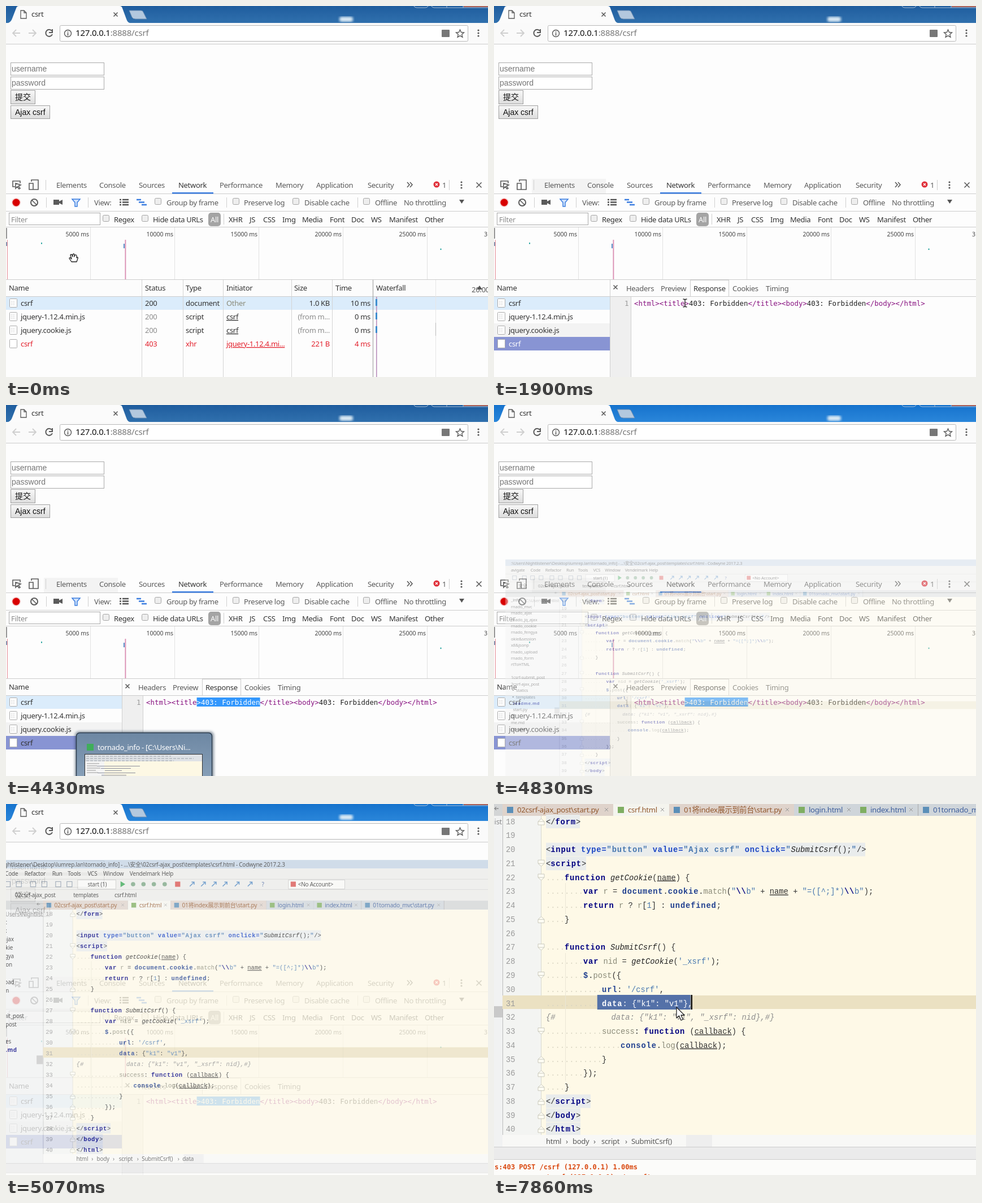
An HTML page for the animation above (8 s loop, 853 px wide and 657 px high).

```html
<!DOCTYPE html>
<html lang="en">
<head>
<meta charset="utf-8">
<title>csrf demo</title>
<style>
html, body { margin: 0; width: 853px; height: 657px; overflow: hidden; background: #fdfdfd }
svg { display: block }
text { font: 13px 'Noto Sans', 'Noto Sans CJK SC', 'Noto Sans CJK', sans-serif; letter-spacing: -.3px; fill: #5a5a5a; white-space: pre }
.dark { fill: #333 } .red, .red tspan { fill: #e3202c } .dim { fill: #8c8c8c } .white { fill: #fff }
.end { text-anchor: end }
.tick { font-size: 10.5px; letter-spacing: 0; fill: #444; text-anchor: end }
.form { font: 14px 'Liberation Sans', 'Noto Sans CJK SC', 'Noto Sans CJK', sans-serif; letter-spacing: 0; fill: #111 }
.hint { fill: #757575 }
.url { font-size: 15px; letter-spacing: -.2px; fill: #777 }
.mono { font: 12.4px 'DejaVu Sans Mono', monospace; letter-spacing: 0; fill: #222 }
.log { font: bold 12px 'DejaVu Sans Mono', monospace; letter-spacing: 0; fill: #d9480f }
.code { font: 13.75px 'Liberation Mono', monospace; letter-spacing: 0; fill: #333 }
.num { fill: #9a9a9a }
.k, .b, .p { font-weight: bold; letter-spacing: .85px }
.k { fill: #000080 } .b { fill: #1c46c4 } .p { fill: #1f3f8f } .s { fill: #4878b0 } .v { fill: #4878b0; font-weight: bold; letter-spacing: .85px }
.i { font-style: italic; fill: #222 } .g { fill: #8a8a78 } .c { font-style: italic; fill: #8c8c8c }
.u { text-decoration: underline; fill: #333 } .d { fill: #d9d5c2 } .t { fill: #881280 } .h { fill: #111 }
.sel text, .sel tspan { fill: #fff }
.tab { fill: #93592f; font-size: 13.2px } .tab2 { fill: #3f5f9c; font-size: 13.2px }
.line { stroke: #ccc; fill: none } .icon { stroke: #5a5a5a; fill: none; stroke-width: 1.6 }
</style>
</head>
<body>
<svg id="stage" width="853" height="657" viewBox="0 0 853 657"></svg>
<script>
const esc = s => s.replace(/&/g, '&amp;').replace(/</g, '&lt;');
const rich = s => esc(s).replace(/«(\w)(.*?)»/g, '<tspan class="$1">$2</tspan>');
const text = (x, y, s, cls = '') => `<text x="${x}" y="${y}" class="${cls}">${rich(s)}</text>`;
const rect = (x, y, w, h, fill, more = '') => `<rect x="${x}" y="${y}" width="${w}" height="${h}" fill="${fill}" ${more}/>`;
const path = (d, more = 'class="line"') => `<path d="${d}" ${more}/>`;
const dot = (x, y, r, fill, more = '') => `<circle cx="${x}" cy="${y}" r="${r}" fill="${fill}" ${more}/>`;
const group = (id, inner, more = '') => `<g id="${id}" ${more}>${inner}</g>`;
// "x label|x label" laid on one baseline
const row = (y, list, cls) => list.split('|').map(e => {
  const [, x, s] = e.match(/^(-?\d+) (.*)$/);
  return text(x, y, s, cls);
}).join('');
const vlines = (xs, y1, y2, color = '#d0d0d0') => path(xs.map(x => `M${x}.5 ${y1}V${y2}`).join(''), `stroke="${color}"`);
const hlines = ys => path(ys.map(y => `M0 ${y}.5H853`).join(''));
const box = (x, y) => rect(x + .5, y + .5, 11, 11, '#eee', 'stroke="#a5a5a5" rx="2"');
const dots3 = (x, y) => [-5, 0, 5].map(d => dot(x, y + d, 1.6, '#555')).join('');
const cross = (x, y, r) => path(`M${x - r} ${y - r}l${2 * r} ${2 * r}m0 ${-2 * r}l${-2 * r} ${2 * r}`, 'class="icon"');

function browser() {
  const field = (y, s) => rect(8.5, y + .5, 165, 22, '#fff', 'stroke="#a9a9a9"') + text(10, y + 16, s, 'form hint');
  const button = (y, w, h, s) => rect(8.5, y + .5, w, h, 'url(#btn)', 'stroke="#a0a0a0"') + text(16, y + 17, s, 'form');
  return rect(0, 0, 853, 657, '#fdfdfd') +
    rect(0, 0, 853, 30, 'url(#glass)', 'id="titlebar"') +
    rect(590, 19, 24, 9, '#dcebf5', 'rx="4" filter="url(#soft)"') +
    path('M722 0q1 3 5 3h15q4 0 5-3M753 0q1 3 5 3h95M780 0v3M809 0v3', 'stroke="#a9c0d8" fill="none"') + rect(810, 0, 43, 2, '#b0665c') +
    path('M4 30q5-2 7-8L18 4q1-4 5-4h178q4 0 5 4l7 19q2 6 6 7z', 'fill="#fbfbfb"') +
    path('M218 8h21q3 0 4 3l6 12h-20q-4 0-6-3z', 'fill="#b3c8de" stroke="#6c8db2"') +
    path('M26 8h6l4 4v10H26zM32 8v4h4', 'class="icon" style="stroke-width:1.3"') + text(45, 19, 'csrt', 'dark') + cross(194, 15, 3.5) +
    rect(0, 30, 853, 37, '#fafafa') + path('M0 67.5H853') + rect(95.5, 34.5, 722, 28, '#fff', 'stroke="#b8b8b8" rx="2"') +
    path('M25 48H12m6-6l-6 6 6 6M40 48h13m-6-6l6 6-6 6', 'fill="none" stroke="#cfcfcf" stroke-width="1.8"') +
    path('M81 44a6 6 0 1 0 1 6M82 41v6h-6', 'class="icon" style="stroke-width:2"') +
    dot(109.5, 48.5, 6, 'none', 'stroke="#555" stroke-width="1.4"') + path('M109.5 45v1.5m0 1v5', 'class="icon"') +
    text(123, 53, '«h127.0.0.1»:8888/csrf', 'url') +
    rect(771, 42, 14, 13, '#777', 'rx="1"') +
    path('M803.500 42l2 4.500 5 .5-3.800 3.300 1.200 4.900-4.400-2.600-4.400 2.600 1.200-4.900-3.800-3.300 5-.5z', 'class="icon" style="stroke-width:1.4"') + dots3(836, 48) +
    field(100, 'username') + field(125, 'password') + button(149, 43, 24, '提交') + button(176, 69, 23, 'Ajax csrf');
}

function devtools() {
  return rect(67, 306, 131, 26, '#f3f3f3', 'id="shade"') +
    hlines([332, 363, 391, 484]) +
    path('M16 320h-4v-10h13v4M17 314l9 3-4 2 3 4-2 1-3-4-3 3z', 'class="icon"') +
    path('M45 311V308h12v17h-9M41 314h7v11h-7z', 'class="icon"') +
    vlines([70, 784], 308, 326) +
    row(322, '89 Elements|165 Console|235 Sources|378 Performance|477 Memory|549 Application|640 Security|772 1') +
    text(305, 322, 'Network', 'dark') + rect(294, 330, 73, 2.5, '#3b7de0') +
    path('M710 312l4 4.500-4 4.500m5-9l4 4.500-4 4.500', 'class="icon"') +
    dot(762, 316, 5.5, '#e0303a') + path('M760 314l4 4m0-4l-4 4', 'stroke="#fff" stroke-width="1.3"') + dots3(806, 317) + cross(837, 317, 4.5) +
    dot(18, 348, 8, '#f6cccc') + dot(18, 348, 6.5, '#d80000') +
    dot(50, 348, 6, 'none', 'stroke="#5a5a5a" stroke-width="2"') + path('M46 344l8 8', 'class="icon"') +
    vlines([71, 145, 390, 622], 339, 357) + path('M84 343h10v3l6-3v9l-6-3v3H84z', 'fill="#5a5a5a"') +
    path('M117 342h14l-5 6v7h-4v-7z', 'fill="#cfe2fb" stroke="#3b7de0" stroke-width="1.5"') +
    path('M201 343h3m2 0h11M201 347.500h3m2 0h11M201 352h3m2 0h11', 'stroke="#555" stroke-width="2.500"') +
    path('M231 343h8M235 347.500h10M240 352h9', 'stroke="#3b7de0" stroke-width="2.500"') +
    [263, 401, 507, 632].map(x => box(x, 340)).join('') +
    row(353, '156 View:|284 Group by frame|421 Preserve log|528 Disable cache|653 Offline|704 No throttling') +
    path('M802 343h9l-4.500 7z', 'fill="#555"') +
    rect(5.5, 366.5, 161, 21, '#fff', 'stroke="#aaa"') + text(9, 383, 'Filter', 'dim') + box(171, 370) + box(240, 370) +
    rect(358, 366, 22, 24, '#a4a4a4', 'rx="5"') + text(362, 383, 'All', 'white') + vlines([385], 368, 387) +
    row(383, '191 Regex|260 Hide data URLs|394 XHR|431 JS|455 CSS|489 Img|524 Media|573 Font|611 Doc|646 WS|678 Manifest|741 Other', 'dark') +
    vlines([149, 298, 447, 596, 745], 392, 484, '#e2e2e2') +
    [1, 2, 3, 4, 5].map(n => text(149 * n - 2, 408, n * 5000 + ' ms', 'tick')).join('') + text(852, 408, '3', 'tick') +
    rect(0, 393, 2, 19, '#999') + vlines([2], 414, 484, '#e58a94') + rect(210.5, 414, 1.8, 70, '#d98db2') +
    rect(0, 418, 2, 7, '#8a9ab5') + rect(208, 421, 2, 8, '#5a8fc8') + rect(62, 419, 2, 2.500, '#2aa6a0') + rect(768.5, 429.5, 2, 2.500, '#2aa6a0') +
    rect(0, 485, 853, 29, '#fcfcfc') + hlines([514]);
}

function requests() {
  const names = ['csrf', 'jquery-1.12.4.min.js', 'jquery.cookie.js', 'csrf'];
  const icon = (y, plain) => rect(6.5, y - 7.5, 13, 15, '#fff', 'stroke="#aaa" rx="1"') +
    (plain ? '' : path(`M9 ${y - 3}h7m-7 3h7m-7 3h7`, 'stroke="#ccc" stroke-dasharray="2 1"'));
  const line = (y, cls, status, type, from, size, time) =>
    text(246, y, status, cls) + text(318, y, type, cls == 'dim' ? 'dark' : cls) + text(390, y, from, cls) +
    text(573, y, size, cls + ' end') + text(645, y, time, (cls == 'dim' ? 'dark' : cls) + ' end');
  const table = rect(0, 515, 853, 23, '#dbecfb') + vlines([240, 313, 384, 505, 577], 485, 657, '#d4d4d4') + vlines([649], 485, 657, '#999') +
    vlines([760], 485, 657, '#e6e6e6') + vlines([760], 561, 584, '#bbb') +
    row(504, '246 Status|318 Type|390 Initiator|510 Size|583 Time|655 Waterfall', 'dark') + text(824, 507, '20.00') + path('M833 502h10l-5-7z', 'fill="#555"') +
    line(531, 'dark', '200', 'document', '«gOther»', '1.0 KB', '10 ms') +
    line(555, 'dim', '200', 'script', '«ucsrf»', '(from m...', '0 ms') +
    line(579, 'dim', '200', 'script', '«ucsrf»', '(from m...', '0 ms') +
    line(603, 'red', '403', 'xhr', '«ujquery-1.12.4.mi...»', '221 B', '4 ms') +
    rect(655, 515, 1.5, 142, '#b58ab8') + [519, 543, 567].map(y => rect(654, y, 3, 12, '#3f8fd0')).join('');
  const source = text(248, 531, '«t<html><title>»403: Forbidden«t</title><body>»403: Forbidden«t</body></html>»', 'mono');
  const pane = rect(0, 515, 205, 23, '#dbecfb') + rect(0, 562, 205, 24, '#f3f3f3') + rect(0, 586, 205, 24, '#8894d3') +
    rect(206, 515, 36, 142, '#efefef') + vlines([205, 242], 515, 657) + vlines([205], 485, 515) + cross(215, 498, 3.5) +
    rect(347.5, 485.5, 68, 29, '#fff', 'stroke="#ccc"') + row(505, '234 Headers|295 Preview|422 Cookies|481 Timing') + text(353, 505, 'Response', 'dark') +
    text(231, 531, '1', 'mono num') + source +
    group('pick', rect(337.6, 518, 0, 16, '#3297fd', 'id="pickBox"') + `<g class="sel" clip-path="url(#pickClip)">${source}</g>`);
  return group('table', table) + group('pane', pane) + text(5, 504, 'Name', 'dark') +
    names.map((s, i) => icon(526 + 24 * i, i == 3) + `<g id="name${i}">${text(26, 531 + 24 * i, s, 'dark')}</g>`).join('');
}

function preview() {
  const rule = i => rect(160 + i * 7 % 20, 627 + i * 4, 25 + i * 37 % 60, 1, '#8b8f9c');
  return rect(122, 578, 246, 90, '#24384f', 'rx="7" opacity=".5" filter="url(#soft)"') +
    rect(124.5, 580.5, 240, 90, 'url(#thumbFill)', 'rx="6" stroke="#2c3c4e" stroke-width="1.5"') +
    rect(143, 600, 12, 12, '#3fae5a') + text(162, 611, 'tornado_info - [C:\\Users\\Ni...', 'white') +
    rect(139.5, 618.5, 208, 50, '#fdf8e4', 'stroke="#333"') + rect(140, 619, 207, 12, '#dfe2e6') + rect(140, 631, 34, 30, '#f4f4f4') +
    path('M142 622h150M142 626h190M142 630h155', 'stroke="#9aa0a8" stroke-dasharray="5 2"') +
    [3, 4, 5, 6, 7].map(rule).join('') + path('M143 635h22m-22 4h18m-18 4h24m-24 4h16m-16 4h20', 'stroke="#999"');
}

const PITCH = 24.77, lineY = n => 31 + (n - 18) * PITCH;
const CODE = [
  '</«kform»>', '', '<«kinput» «btype=»«v"button"» «bvalue=»«v"Ajax csrf"» «bonclick=»«v"»«iSubmitCsrf»();«v"»/>', '<«kscript»>',
  '    «kfunction» «igetCookie»(«uname») {',
  '        «kvar» «gr» = «pdocument».«pcookie».«gmatch»(«s"»«k\\\\»«sb"» + «uname» + «s"=([^;]*)»«k\\\\»«sb"»);',
  '        «kreturn» «gr» ? «gr»[«s1»] : «pundefined»;', '    }', '',
  '    «kfunction» «iSubmitCsrf»() {', "        «kvar» «gnid» = «igetCookie»(«s'_xsrf'»);", '        «p$».«gpost»({',
  "            «purl»: «s'/csrf'»,", '            «pdata»: {«s"k1"»: «s"v1"»},',
  '«c{#            data: {"k1": "v1", "_xsrf": nid},#}»',
  '            «gsuccess»: «kfunction» («ucallback») {', '                «pconsole».«glog»(«ucallback»);',
  '            }', '        });', '    }', '</«kscript»>', '</«kbody»>', '</«khtml»>'];
const dataLine = () => text(92, lineY(31) + 4.5, CODE[13], 'code');

function editor() {
  const tag = (n, w) => rect(92, lineY(n) - 12, w, 24, '#e9ecec');
  const fold = (n, end) => path(`M78 0h11v-6h-11zm0 0l5.500 5 5.500-5`, `transform="translate(0 ${lineY(n)}) scale(1 ${end ? -1 : 1})" fill="#fffdf4" stroke="#c9c9bd"`);
  const tab = (x, w, s, cls, active, color) => rect(x, 0, w, 21, active ? '#f4f4ee' : cls == 'tab' ? '#dfd3cb' : '#cfd5da') + vlines([x + w], 0, 21, '#aaa') +
    rect(x + 8, 5, 11, 11, color) + text(x + 26, 15, s, cls) + (w < 240 ? path(`M${x + w - 15} 7l6 6m0-6l-6 6`, 'stroke="#999"') : '');
  const tree = ['_info', 'rnado_mvc', 'rnado_ajax', 'rnado_jq_ajax', 'rnado_cookie', 'rnado_fengya', 'okie&session', 'x8&jsonp', 'rnado_upload', 'rnado_form', 'rtToHTML', '',
    '1csrf-submit_post', '2csrf-ajax_post', '▪ statics', '▪ templates', '  «kreadme.md»', '  start.py', '用', 'me.md', 'Libraries'];
  const frame = rect(-150, -94, 1500, 20, '#c3d3e4') +
    text(-133, -78, ':\\Users\\Nightlistener\\Desktop\\lumrep.lan\\tornado_info] - ...\\安全\\02csrf-ajax_post\\templates\\csrf.html - Codwyne 2017.2.3', 'dark') +
    rect(-150, -74, 1500, 74, '#ecece9') + path('M-150-49.500H1350M-150-25.500H1350') +
    row(-57, '-133 avigate|-73 Code|-28 Refactor|36 Run|72 Tools|118 VCS|154 Window|215 Vendelmark|289 Help', 'dark') +
    [-128, -98, -73, -47, -14, 12, 44, 70].map(x => rect(x, -44, 12, 12, 'none', 'stroke="#8b98a8" stroke-width="1.500"')).join('') +
    rect(95, -48, 88, 21, '#f8f8f6', 'stroke="#bbb"') + text(118, -33, 'start (1)', 'dark') + path('M194-45v14l11-7z', 'fill="#3aa655"') +
    [219, 243, 267, 292].map(x => dot(x + 4, -38, 5, '#7aa584')).join('') + rect(320, -44, 12, 12, '#d9534f') +
    [354, 380, 405, 430, 458, 488].map(x => path(`M${x} -33l10-10m-6 0h6v6`, 'stroke="#4d86c0" stroke-width="2" fill="none"')).join('') +
    text(520, -33, '?', 'tab2') + rect(582, -48, 130, 21, '#f8f8f6', 'stroke="#bbb"') + rect(587, -44, 12, 12, '#d9534f') + text(604, -33, '<No Account>', 'dark') +
    row(-8, '-110 安全|-50 02csrf-ajax_post|85 templates|180 csrf.html', 'dark');
  return frame + rect(-150, 0, 1500, 21, '#d3d5d6') + rect(-150, 21, 165, 600, '#f1f2f2') + text(14, 36, 'C:\\Users\\Nightlist', 'dim end') +
    tree.map((s, i) => text(-133, 35 + i * 19.7, s, 'dark')).join('') + path('M8 8H1l3-3M1 8l3 3', 'stroke="#666" fill="none"') + rect(0, 358, 15, 20, '#c9c9c9') +
    tab(15, 196, '02csrf-ajax_post\\start.py', 'tab', 0, '#5b8fb8') + tab(211, 99, 'csrf.html', 'tab', 1, '#7fae62') +
    tab(310, 221, '01将index展示到前台\\start.py', 'tab', 0, '#5b8fb8') + tab(531, 109, 'login.html', 'tab2', 0, '#7fae62') +
    tab(640, 110, 'index.html', 'tab2', 0, '#7fae62') + tab(751, 190, '01tornado_mvc\\start.py', 'tab2', 0, '#5b8fb8') +
    rect(15, 21, 68, 565, '#f3f4f2') + rect(83, 21, 1300, 565, '#fef9e7') + vlines([15], 21, 607, '#bbb') + vlines([83], 21, 586, '#d8d8d0') +
    rect(15, 339, 1300, 24, '#ebe1c2') +
    tag(18, 60) + tag(20, 565) + tag(21, 71) + tag(38, 79) + tag(39, 61) + tag(40, 61) +
    vlines([126], 140, 195, '#eae6d6') + vlines([126], 264, 490, '#eae6d6') +
    CODE.map((s, i) => text(21, lineY(i + 18) + 4.5, String(i + 18), 'code num') +
      text(92, lineY(i + 18) + 4.5, s.replace(/^ +/, m => `«d${'.'.repeat(m.length)}»`), 'code')).join('') +
    [21, 22, 27, 29, 33].map(n => fold(n)).join('') + [18, 25, 35, 36, 37, 38, 39, 40].map(n => fold(n, 1)).join('') +
    group('mark', rect(182.75, 338, 0, 26, '#5471a8', 'id="markBox"') + `<g class="sel" clip-path="url(#markClip)">${dataLine()}</g>` + rect(348, 338, 2.5, 26, '#111', 'id="caret"')) +
    rect(15, 586, 1400, 21, '#f8f8f6') + rect(340, 586, 46, 21, '#eeeeee') +
    row(602, '92 html|127 ›|139 body|176 ›|190 script|232 ›|243 SubmitCsrf()') + group('crumb', row(602, '326 ›|337 data')) +
    rect(-150, 607, 1500, 22, '#ebebeb') + path('M-150 607.500H1350M-150 629.500H1350') + rect(-150, 630, 1500, 120, '#fcfcfa') +
    text(1, 647, 's:403 POST /csrf (127.0.0.1) 1.00ms', 'log') + text(90, 665, "/csrf (127.0.0.1): '_xsrf'", 'log');
}

const ink = 'fill="#fff" stroke="#222" stroke-width="1.300" stroke-linejoin="round"';
const cursors = {
  grab: path('M-3 7l-4-6q0-2 2-1l2 2-2-7q1-2 3 0l1 3v-4q2-2 3 0v4l1-3q2-1 3 1v4l1-1q2 0 1 2l-2 6z', ink),
  hand: path('M-2 2q0-2 2-2t2 2v8q9 1 12 4v6l-2 6h-13l-7-10q-1-3 2-2l4 3zM2 10v4m4-3v4m4-3v4', ink),
  beam: path('M-3.500-7q3 0 3.500 1.500q.5-1.500 3.500-1.500M0-6V6M-3.500 7q3 0 3.500-1.500q.5 1.500 3.500 1.500', 'fill="none" stroke="#222" stroke-width="1.300"'),
  arrow: path('M0 0v19l4.500-4 3.500 8 3.500-1.500-3.500-7.500h6z', ink)
};

const gradient = (id, a, b) => `<linearGradient id="${id}" x2="0" y2="1"><stop stop-color="${a}"/><stop offset="1" stop-color="${b}"/></linearGradient>`;
const stage = document.getElementById('stage');
stage.innerHTML = '<defs>' + gradient('btn', '#f8f8f8', '#dcdcdc') + gradient('glass', '#1f5d9e', '#3070ad') + gradient('bright', '#1673cd', '#2a86da') +
  gradient('thumbFill', '#6d87a3', '#8ba3bb') + '<filter id="soft"><feGaussianBlur stdDeviation="2"/></filter>' +
  '<clipPath id="pickClip"><rect x="337.6" y="515" width="0" height="22"/></clipPath><clipPath id="markClip"><rect x="182.75" y="338" width="0" height="26"/></clipPath></defs>' +
  browser() + devtools() + requests() + group('thumb', preview()) + group('ide', editor()) +
  Object.entries(cursors).map(([id, d]) => group(id, d)).join('');

const $ = id => document.getElementById(id);
const show = (id, on) => { $(id).style.display = on ? '' : 'none'; };
const setWidth = (w, ...els) => els.forEach(el => el.setAttribute('width', w));

const STEPS = [[150, 900, 7], [1050, 1050, 1], [1200, 1900, 6], [2170, 2860, 6], [3290, 3720, 4], [4430, 5450, 9], [5610, 6590, 8], [6710, 7590, 7], [7860, 7860, 1]];
function snap(t) {
  let last = 0;
  for (const [a, b, n] of STEPS) if (t >= a) {
    const gap = (b - a) / (n - 1) || 1;
    last = Math.min(b, a + Math.floor((t - a) / gap) * gap);
  }
  return last;
}
function track(keys, t) {
  const i = keys.findIndex(k => k[0] > t);
  if (i < 1) return keys[i ? keys.length - 1 : 0].slice(1);
  const [a, b] = [keys[i - 1], keys[i]], p = (t - a[0]) / (b[0] - a[0]);
  return a.slice(1).map((v, j) => v + (b[j + 1] - v) * p);
}
const POINTER = [[0, 119, 446], [150, 119, 446], [700, 184, 600], [900, 184, 600], [1050, 460, 592], [1200, 455, 588], [1760, 340, 530], [1900, 338, 526],
  [2170, 340, 525], [2860, 447, 522], [3290, 446, 540], [3720, 405, 680], [4430, 240, 680], [5450, 398, 398], [5610, 390, 394], [6310, 199, 353], [6590, 186, 353],
  [6710, 190, 353], [7590, 346, 354], [7860, 323, 360]];
// x, y, scale and opacity of the opening window
const OPENING = [[4680, 130, 390, .52, .15], [4940, 85, 268.4, .637, .62], [5200, 22, 70, .9, .92], [5320, 0, 0, 1, 1]];

function draw(time) {
  const t = snap(time), [x, y] = track(POINTER, t);
  const open = t >= 770;
  show('table', !open);
  show('pane', open);
  show('shade', open);
  $('name3').firstChild.setAttribute('class', !open ? 'red' : t < 2170 ? 'white' : 'dark');
  const picked = t < 2170 ? 0 : t < 3290 ? Math.floor((x - 337.6) / 7.464) : 15;
  setWidth(Math.max(0, picked) * 7.464, $('pickBox'), $('pickClip').firstChild);

  show('thumb', t >= 4430 && t < 4680);
  $('titlebar').setAttribute('fill', t >= 4680 ? 'url(#bright)' : 'url(#glass)');
  show('ide', t >= 4680);
  const [dx, dy, scale, alpha] = track(OPENING, t);
  $('ide').setAttribute('transform', `translate(${dx} ${dy}) scale(${scale})`);
  $('ide').setAttribute('opacity', alpha);
  const marked = t >= 7590 ? 165 : t >= 6710 ? x - 182.75 : 0;
  setWidth(marked, $('markBox'), $('markClip').firstChild);
  show('caret', marked);
  $('caret').setAttribute('x', 183.5 + marked);
  show('crumb', !marked);

  const kind = t >= 7860 ? 'arrow' : t < 400 ? 'grab' : t < 1050 ? 'hand' : t >= 3720 && t < 5450 ? '' : 'beam';
  for (const id in cursors) show(id, id == kind);
  if (kind) $(kind).setAttribute('transform', `translate(${x} ${y})`);
}
const start = performance.now();
function tick() {
  draw((performance.now() - start) % 8000);
  requestAnimationFrame(tick);
}
tick();
</script>
</body>
</html>
```
